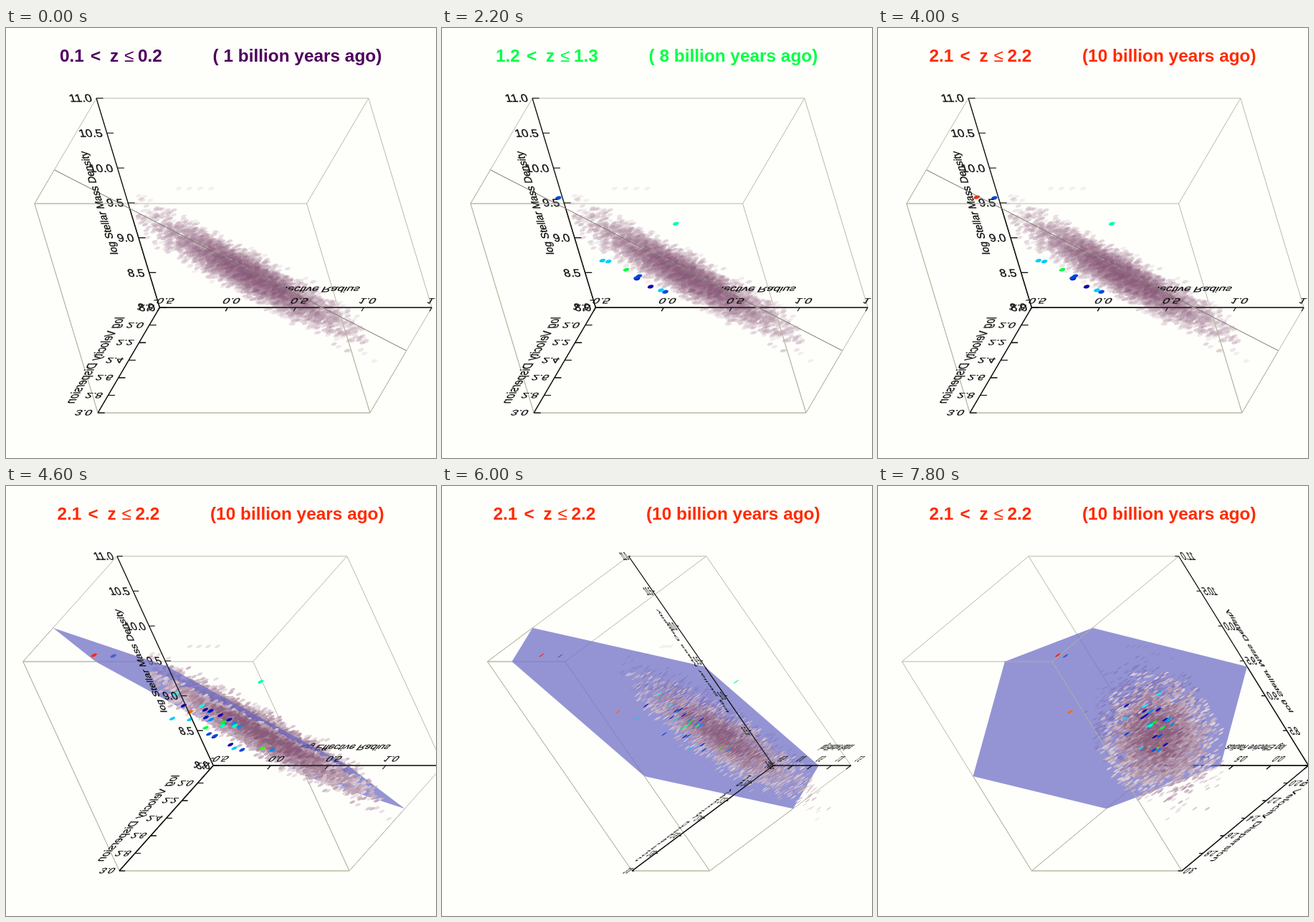
An HTML page with a canvas for the animation above (8 s loop, 600 by 600 pixels).

```html
<!DOCTYPE html>
<html lang="en">
<head>
<meta charset="utf-8">
<title>Rotating scatter cube</title>
<style>
html, body { margin: 0; width: 100%; height: 100%; overflow: hidden; background: #fefefb; }
canvas { display: block; width: 600px; height: 600px; }
</style>
</head>
<body>
<canvas id="stage" width="600" height="600"></canvas>
<script>
const ctx = document.getElementById('stage').getContext('2d');
const FONT = '"Liberation Sans", Arial, sans-serif';
const LOOP = 8000, STEP = 200, LAST_SLICE = 20, MID = 317;
const INK = '#101010', BOX = '#b9b9a2';
const rad = deg => deg * Math.PI / 180;
const lerp = (a, b, t) => a.map((v, i) => v + (b[i] - v) * t);

// Slices run through the rainbow, from dark violet to red
const sliceColor = n => `hsl(${290 - 14 * n}, 100%, ${Math.min(50, 18 + 5 * n)}%)`;

// Lookback time in billions of years, flat universe with 70% dark energy
const cosmicAge = z => 11.13 * Math.asinh(1.5275 / (1 + z) ** 1.5);
const lookback = z => Math.floor(cosmicAge(0) - cosmicAge(z));

let seed = 20117;
function random() {
  seed = (seed * 1664525 + 1013904223) % 4294967296;
  return seed / 4294967296;
}
const gauss = () => Math.sqrt(-2 * Math.log(1 - random())) * Math.cos(2 * Math.PI * random());

// Cube coordinates u, v, w run from -1 to 1; the cube turns about the vertical screen axis
let cos = 1, sin = 0;
const project = ([u, v, w]) => [
  MID + 209.5 * u * cos - (102 * v + 104.5 * w) * sin,
  317.5 - 146 * w + 73.5 * v
];
const planeW = (u, v) => -0.072 - 0.8 * u + 0.788 * v;
const height = ([u, v, w]) => w - planeW(u, v);
const isBehind = at => height(at) > 0;
const PLANE = [[-1, 0.36, 1], [-1, -1, -0.055], [0.17, -1, -1], [1, -0.18, -1], [1, 1, -0.096], [-0.37, 1, 1]];

const cloud = [];
while (cloud.length < 4000) {
  const a = gauss(), b = gauss(), c = gauss(), r2 = a * a + b * b;
  if (r2 > 5.4 || Math.abs(c) > 2.8) continue;
  const u = -0.04 + 0.3 * a, v = -0.37 + 0.215 * b;
  const at = [u, v, planeW(u, v) - 0.045 + 0.11 * c];
  const dense = Math.exp(-(r2 + 0.7 * c * c) / 3);
  const t = Math.min(1, Math.max(0, dense + (random() - 0.5) * 0.6));
  cloud.push({
    at, behind: isBehind(at), rank: t + (random() - 0.5) * 0.9,
    color: `rgb(${lerp([230, 217, 222], [138, 92, 122], t).map(Math.round)})`
  });
}
for (let i = 0; i < 4; i++) {
  cloud.push({ at: [-0.43 + 0.08 * i, -0.52, 0.38], behind: true, rank: -1, color: '#e6dcda' });
}
cloud.sort((a, b) => a.rank - b.rank);

// Distant points appear with their slice; those inside the cloud only once it turns
const distant = [];
function addDistant(at, slice, from = slice) {
  distant.push({ at, color: sliceColor(slice), from, behind: isBehind(at) });
}
addDistant([-0.53, 0.456, 0.78], 5);
addDistant([-0.19, -0.9, -0.149], 9);
addDistant([-0.61, 0.593, 0.856], 20);
addDistant([-0.1, 0.432, 0.234], 19, LAST_SLICE + 1);
for (let i = 0; i < 27; i++) {
  const outside = i % 3 === 0;
  const u = -0.3 + 0.16 * gauss(), v = -0.2 + 0.16 * gauss();
  const depth = outside ? 0.33 + 0.06 * random() : 0.08 + 0.15 * random();
  const slice = 3 + Math.floor(i % 9 * 0.75) + (i % 8 === 0 ? 4 : 0);
  addDistant([u, v, planeW(u, v) - depth], slice, outside ? slice : LAST_SLICE + 1);
}

function line(a, b, color, width) {
  ctx.strokeStyle = color;
  ctx.lineWidth = width;
  ctx.beginPath();
  ctx.moveTo(...a);
  ctx.lineTo(...b);
  ctx.stroke();
}

// A cube line; the front pass keeps only the part before the plane
function edge(a, b, front, color, width) {
  if (front) {
    const ha = height(a), hb = height(b);
    if (ha > 0 && hb > 0) return;
    const cut = lerp(a, b, ha / (ha - hb));
    if (ha > 0) a = cut;
    else if (hb > 0) b = cut;
  }
  line(project(a), project(b), color, width);
}

function dot(point, radius) {
  ctx.setTransform(cos, 0, -0.813 * sin, 0.585, ...project(point.at));
  ctx.fillStyle = point.color;
  ctx.beginPath();
  ctx.arc(0, 0, radius, 0, 2 * Math.PI);
  ctx.fill();
}
const resetView = () => ctx.setTransform(1, 0, 0, 1, 0, 0);

// Text lying in the cube: base and up are screen vectors
function label(text, at, front, base, up, size, align) {
  if (isBehind(at) === front) return;
  ctx.setTransform(base[0], base[1], -up[0], -up[1], ...project(at));
  ctx.font = `${size}px ${FONT}`;
  ctx.textAlign = align;
  ctx.textBaseline = 'alphabetic';
  ctx.fillStyle = ctx.strokeStyle = INK;
  ctx.lineWidth = 0.4;
  ctx.fillText(text, 0, size * 0.36);
  ctx.strokeText(text, 0, size * 0.36);
  resetView();
}

function drawBox(front) {
  for (const a of [-1, 1]) for (const b of [-1, 1]) {
    edge([-1, a, b], [1, a, b], front, BOX, 1);
    edge([a, -1, b], [a, 1, b], front, BOX, 1);
    edge([a, b, -1], [a, b, 1], front, BOX, 1);
  }
}

function drawAxes(front) {
  const U = [cos, 0], V = [-0.813 * sin, 0.585], W = [-0.582 * sin, -0.813], back = [-cos, 0];
  const origin = [-1, -1, -1];
  for (const end of [[1, -1, -1], [-1, 1, -1], [-1, -1, 1]]) edge(origin, end, front, INK, 1.3);
  for (let i = 0; i <= 6; i++) {
    const t = -1 + i / 3;
    edge([-1, -1, t], [-0.95, -1, t], front, INK, 1.1);
    edge([-1, t, -1], [-0.95, t, -1], front, INK, 1.1);
    label((8 + i / 2).toFixed(1), [-1.035, -1, t], front, U, W, 18.5, 'right');
    label((1.8 + i / 5).toFixed(1), [-1.043, t, -1], front, U, V, 18.5, 'right');
  }
  for (let i = 0; i <= 4; i++) {
    const t = -1 + i / 2;
    edge([t, -1, -1], [t, -0.93, -1], front, INK, 1.1);
    label((-0.5 + i / 2).toFixed(1), [t, -1.12, -1], front, U, V, 18.5, 'center');
  }
  label('log Stellar Mass Density', [-1.215, -1, 0], front, W, back, 16.5, 'center');
  label('log Velocity Dispersion', [-1.25, 0, -1], front, V, back, 20.5, 'center');
  label('log Effective Radius', [0, -1.34, -1], front, U, V, 18.5, 'center');
}

function drawPlane() {
  ctx.fillStyle = 'rgba(105, 105, 196, .7)';
  ctx.beginPath();
  for (const corner of PLANE) ctx.lineTo(...project(corner));
  ctx.fill();
}

function drawPoints(step, behind) {
  ctx.globalAlpha = step > LAST_SLICE ? 0.85 : 0.45;
  for (const p of cloud) if (p.behind === behind) dot(p, 4);
  ctx.globalAlpha = 1;
  for (const p of distant) if (p.behind === behind && step >= p.from) dot(p, 4.4);
  resetView();
}

function drawTitle(slice) {
  const low = (slice + 1) / 10, age = lookback(low), shift = age > 9 ? -3.5 : 0;
  const put = (text, x, weight = 'bold') => {
    ctx.font = `${weight} 24.4px ${FONT}`;
    ctx.fillText(text, x + shift, 47);
  };
  ctx.fillStyle = sliceColor(slice);
  ctx.textAlign = 'left';
  ctx.textBaseline = 'alphabetic';
  put(low.toFixed(1), 75);
  put('<', 118);
  put('z', 145);
  put('≤', 165, 'normal');
  put((low + 0.1).toFixed(1), 184);
  put(`(${age > 9 ? '' : ' '}${age} billion years ago)`, 288.5);
}

function draw(step) {
  const edgeOn = step <= LAST_SLICE;
  const angle = rad(25 + 5 * Math.max(0, step - LAST_SLICE));
  cos = Math.cos(angle);
  sin = Math.sin(angle);
  resetView();
  ctx.fillStyle = '#fefefb';
  ctx.fillRect(0, 0, 600, 600);
  drawBox(false);
  drawPoints(step, true);
  drawAxes(false);
  if (!edgeOn) drawPlane();
  drawPoints(step, false);
  if (edgeOn) line(project(PLANE[0]), project(PLANE[3]), '#77776a', 1);
  drawBox(true);
  drawAxes(true);
  drawTitle(Math.min(step, LAST_SLICE));
}

let shown = -1;
const start = performance.now();
function tick() {
  const step = Math.floor((performance.now() - start) % LOOP / STEP);
  if (step !== shown) draw(shown = step);
  requestAnimationFrame(tick);
}
tick();
</script>
</body>
</html>
```
